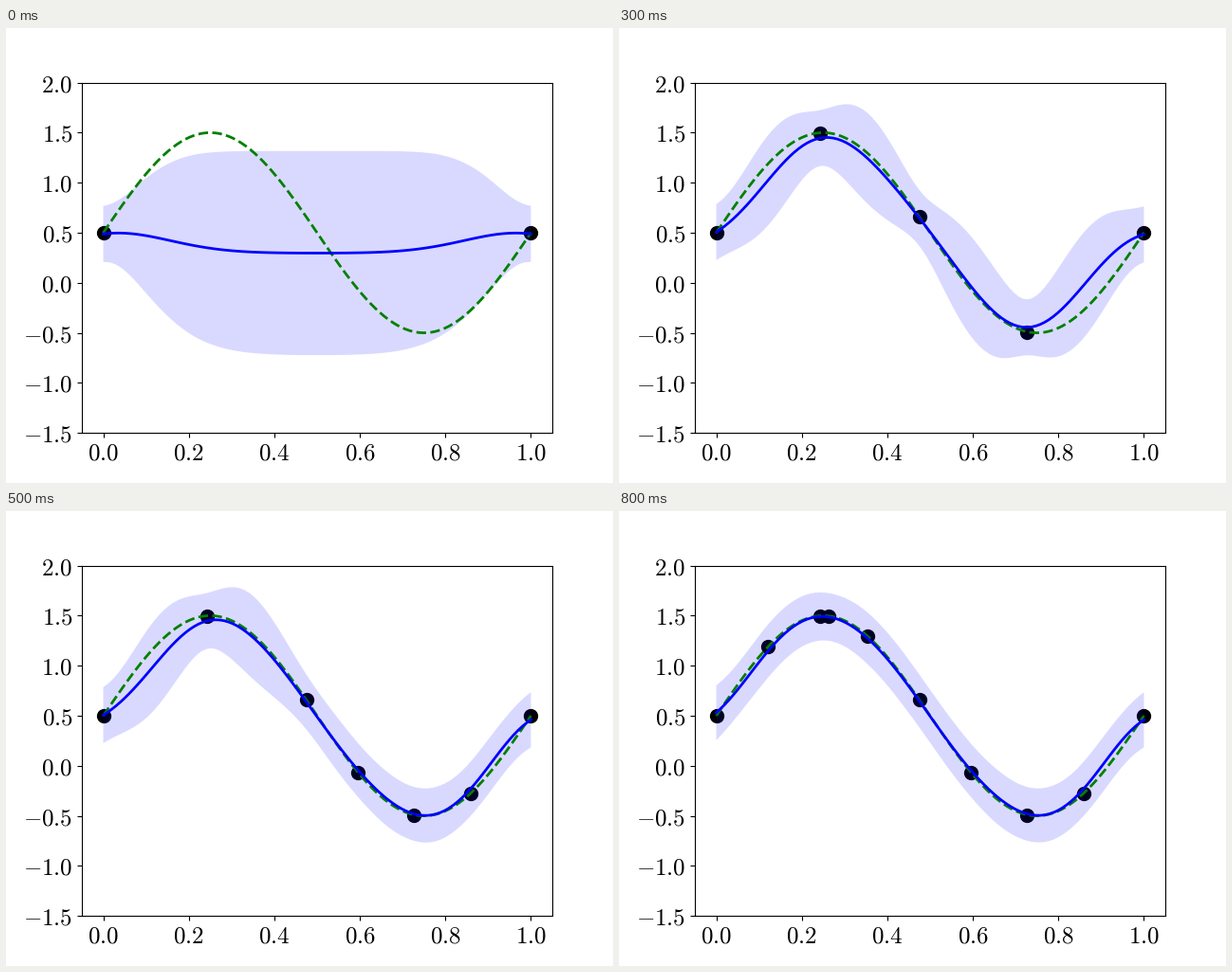
These frames come from a looping animation (640 px wide and 480 px high, 900 ms). A matplotlib script:

```python
import numpy as np
import matplotlib.pyplot as plt
from matplotlib.animation import FuncAnimation

plt.rcParams.update({"mathtext.fontset": "cm", "font.size": 18})

ALPHA = 2.0     # prior precision of the weights
BETA = 25.0     # noise precision
WIDTH = 0.1     # width of each Gaussian basis function
CENTERS = np.linspace(0, 1, 10)
GRID = np.linspace(0, 1, 100)

# Grid indices to sample; each batch starts with its most uncertain point.
BATCHES = [[47], [72], [24], [85], [12, 59], [35], [26]]


def truth(x):
    return 0.5 + np.sin(2 * np.pi * x)


def features(x):
    bumps = np.exp(-0.5 * ((x[:, None] - CENTERS) / WIDTH) ** 2)
    return np.hstack([np.ones((len(x), 1)), bumps])


def predict(x):
    """Posterior mean and standard deviation on the grid."""
    phi, grid_phi = features(x), features(GRID)
    cov = np.linalg.inv(ALPHA * np.eye(phi.shape[1]) + BETA * phi.T @ phi)
    mean = grid_phi @ (BETA * cov @ phi.T @ truth(x))
    var = 1 / BETA + np.sum(grid_phi @ cov * grid_phi, axis=1)
    return mean, np.sqrt(var)


def sampling_order():
    order = [0, 99]
    for batch in BATCHES:
        left = list(batch)
        while left:
            std = predict(GRID[order])[1]
            best = max(left, key=lambda i: std[i])
            order.append(best)
            left.remove(best)
    return order


ORDER = sampling_order()
STEPS = len(ORDER) - 1

fig, ax = plt.subplots(figsize=(6.4, 4.8), dpi=100)
dots = ax.scatter([], [], s=100, color="black")
band = ax.fill_between(GRID, GRID, GRID, facecolor="blue", alpha=0.15, linewidth=0)
ax.plot(GRID, truth(GRID), "--", color="green", lw=2)
curve, = ax.plot(GRID, GRID, color="blue", lw=2)

ax.set_xlim(-0.05, 1.05)
ax.set_ylim(-1.5, 2)
ax.set_xticks(np.linspace(0, 1, 6))
ax.set_yticks(np.linspace(-1.5, 2, 8))
for axis in (ax.xaxis, ax.yaxis):
    axis.set_major_formatter(lambda v, pos: f"${v:.1f}$")


def update(step):
    x = GRID[ORDER[:step + 2]]
    mean, std = predict(x)
    dots.set_offsets(np.column_stack([x, truth(x)]))
    curve.set_ydata(mean)
    upper = np.column_stack([GRID, mean + std])
    lower = np.column_stack([GRID, mean - std])
    band.set_verts([np.vstack([upper, lower[::-1]])])
    return dots, band, curve


anim = FuncAnimation(fig, update, frames=STEPS, interval=100,
                     repeat=True, repeat_delay=0, blit=False)
plt.show()
```
